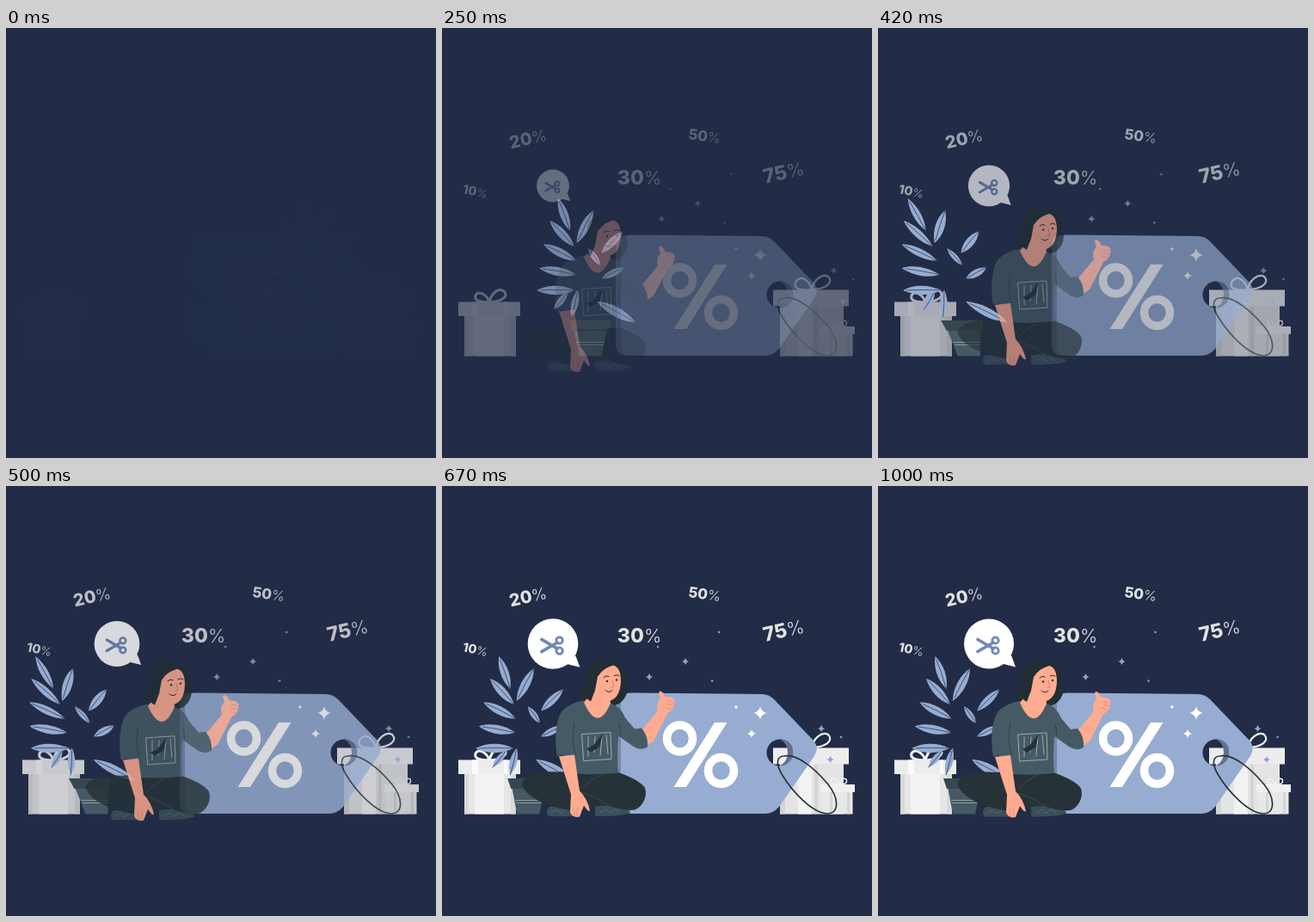
These frames come from a looping animation (500x500 px, 1.04 s). An HTML page:

```html
<!DOCTYPE html>
<html lang="en">
<head>
<meta charset="utf-8">
<title>Discounts</title>
<style>
html, body { margin: 0; height: 100%; overflow: hidden; background: #222c47; }
svg { display: block; width: 100vw; height: 100vh; }
text { font: 800 1em Inter, sans-serif; fill: #e2e2e2; text-anchor: middle; }
tspan { font-weight: 300; font-size: .94em; }
.line { fill: none; stroke-linecap: round; stroke-linejoin: round; }
.skin { fill: #ffab90; }
</style>
</head>
<body>
<svg viewBox="0 0 500 500">
  <defs>
    <path id="star" d="M0-4Q.8-.8 4 0Q.8 .8 0 4Q-.8 .8-4 0Q-.8-.8 0-4Z"/>
    <circle id="dot" r="1.200"/>
  </defs>

  <g class="fade">
    <!-- left gift -->
    <path class="line" d="M55 319C44 319 37 317 39 311C42 305 52 309 55 319C58 307 66 302 72 306C78 312 70 318 55 319" stroke="#f2f2f2" stroke-width="3"/>
    <path d="M26 334H86V381.500H26Z" fill="#e6e6e6"/>
    <path d="M26 334H31V381.500H26ZM80 334H86V381.500H80Z" fill="#d9d9d9"/>
    <path d="M38 334H72V381.500H38Z" fill="#f3f3f3"/>
    <path d="M19 318.500H91V335H19Z" fill="#ececec"/>
    <path d="M35 318.500H42V335H35ZM72 318.500H76V335H72Z" fill="#fafafa"/>
    <!-- right gifts -->
    <path class="line" d="M430 304C417 306 408 303 411 296C417 285 427 294 430 304C432 293 442 285 449 289C456 296 446 304 430 304" stroke="#f2f2f2" stroke-width="2.200"/>
    <path d="M393 323H467V381.500H393Z" fill="#e4e4e4"/>
    <path d="M393 323H399V381.500H393ZM433 323H437V381.500H433Z" fill="#d4d4d4"/>
    <path d="M414 323H430V381.500H414Z" fill="#f2f2f2"/>
    <path d="M385 304.500H473V323.500H385Z" fill="#ededed"/>
    <path class="line" d="M462 347C452 347 450 341 455 340Q460 341 462 347Q465 338 470 341C472 346 468 347 462 347" stroke="#f2f2f2" stroke-width="1.500"/>
    <path d="M442 355H477.500V381.500H442Z" fill="#e8e8e8"/>
    <path d="M451 355H454V381.500H451ZM471 355H474V381.500H471Z" fill="#d6d6d6"/>
    <path d="M440 347H480V356H440Z" fill="#f0f0f0"/>
  </g>

  <g id="plant">
    <path d="M81 350H120L113 381.500H87Z" fill="#455a64"/>
    <path d="M76 340H125L121 352H80Z" fill="#37474f"/>
    <path d="M85 365.500H116M86 368.500H115" stroke="#8c9ba3"/>
  </g>

  <g class="fade">
    <!-- tag -->
    <path d="M218 241H210Q202 243 202 254V368Q202 379 212 381H222Z" fill="#7587ab"/>
    <path fill-rule="evenodd" d="M220 240.500L372 242Q380 242 386 248L432 296Q439 304 433 314L392 373Q385 381 376 381H220Q208 381 208 370V252Q208 240.500 220 240.500ZM393 294.500A15.500 15.500 0 1 0 393 325.500A15.500 15.500 0 1 0 393 294.500Z" fill="#97acd1"/>
    <path d="M393 294.500A15.500 15.500 0 0 1 393 325.500Q402 320 402 310Q402 299 393 294.500Z" fill="#62718f"/>
    <path class="line" d="M398 314C389 314 388 323 395 335C407 355 430 380 448 381C463 381 461 362 449 347C434 329 413 311 398 314" stroke="#263238" stroke-width="1.600"/>
    <g fill="none" stroke="#fff" stroke-width="9.500">
      <ellipse cx="276.500" cy="293.500" rx="15" ry="15.500"/>
      <ellipse cx="324.500" cy="331" rx="15" ry="15.500"/>
    </g>
    <path d="M317 275H331.500L284 350H269.500Z" fill="#fff"/>
    <g fill="#fff">
      <use href="#star" transform="translate(370 264) scale(1.900)"/>
      <use href="#star" transform="translate(360 288) scale(1.250)"/>
      <use href="#star" transform="translate(342 257) scale(.600)"/>
    </g>
  </g>

  <g class="fade">
    <text transform="translate(37.500 195) rotate(12)" font-size="14.500" style="font-size:14.5px">10<tspan>%</tspan></text>
    <text transform="translate(101.500 135.500) rotate(-13)" style="font-size:20px">20<tspan>%</tspan></text>
    <text transform="translate(229.500 181.500)" style="font-size:23px">30<tspan>%</tspan></text>
    <text transform="translate(304.500 131.500) rotate(8)" style="font-size:17px">50<tspan>%</tspan></text>
    <text transform="translate(399 175.500) rotate(-13)" style="font-size:23px">75<tspan>%</tspan></text>
  </g>

  <g class="fade" id="sparks" fill="#8fa5cd">
    <use href="#star" x="241.500" y="222"/>
    <use href="#star" x="283.500" y="204"/>
    <use href="#star" x="441.500" y="282"/>
    <use href="#star" x="452" y="318"/>
    <use href="#dot" x="251.500" y="187"/>
    <use href="#dot" x="322.500" y="170"/>
    <use href="#dot" x="314.500" y="226.500"/>
    <use href="#dot" x="464.500" y="292"/>
  </g>

  <g class="fade" id="bubble">
    <path d="M155 197L160 210.500L142 206Z" fill="#fff"/>
    <circle cx="129" cy="183.500" r="29" fill="#fff"/>
    <g class="line" stroke="#7188b4">
      <path d="M116 178.500L134 189M116 192.500L134 182" stroke-width="3.600"/>
      <circle cx="136.500" cy="179.500" r="3.700" stroke-width="2.800"/>
      <circle cx="136.500" cy="191.500" r="3.700" stroke-width="2.800"/>
    </g>
  </g>

  <g class="fade" id="person">
    <!-- hair behind the head -->
    <path d="M192 203C178 200 169 208 169 221C166 232 158 239 160 247C163 254 170 251 173 255Q190 260 205 254C213 250 219 237 214 229C215 213 207 202 192 203Z" fill="#222e33"/>
    <!-- feet -->
    <path d="M124 374Q140 370 154 377V384.500H124Q120 380 124 374ZM178 373L205 371Q219 376 219 381Q206 385 178 384.500Z" fill="#3c4f58"/>
    <path d="M127 380L133 377L138 381L144 377M184 380L190 376L195 381L201 376L207 380" class="line" stroke="#566b75"/>
    <!-- trousers -->
    <path d="M134 333C113 331 92 337 93 348C98 363 124 374 152 378L190 371Q213 379 224 377C235 373 240 358 235 350C227 341 211 336 199 331Z" fill="#263238"/>
    <path class="line" d="M160 357Q176 359 193 372M186 336Q172 342 164 352" stroke="#44535a" stroke-width=".8"/>
    <!-- raised forearm and hand -->
    <path class="skin" d="M234 305L246 297Q256 278 262 265Q271 261 270.500 250Q268 245 260 246Q257 239 253 239Q251 241 254 247Q248 255 251 262L231 286Z"/>
    <path class="line" d="M262 250L269 252M262 254L269 256M260 258L266 260" stroke="#df8a72" stroke-width=".8"/>
    <!-- shirt and neck -->
    <path d="M165 250Q176 266 196 253Q208 257 213 270L224 283L232 282Q240 291 239 304Q230 309 222 303L205 291Q203 316 205 334Q166 338 141 333V313L134 315C130 291 133 266 143 259Q152 252 165 250Z" fill="#455a64"/>
    <path class="skin" d="M165 252L176 238H194L196 253Q181 288 165 252Z"/>
    <path class="line" d="M154 276Q150 294 155 313M206 276L208 290" stroke="#30434b"/>
    <path class="line" d="M163 289L196 287L197 318L165 320ZM170 292V315M178 292L177 310M186 291L184 314M191 290L193 312" stroke="#a8b4b9" stroke-width=".9"/>
    <path d="M168 306L176 302L187 288L183 304L173 310Z" fill="#263238"/>
    <!-- lowered arm -->
    <path class="skin" d="M136 315L154 313L160 355Q169 364 172 378Q170 380 165 372L160 385Q152 387 149 380L150 359Z"/>
    <path class="line" d="M153 374L154 384M158 374L157 384" stroke="#df8a72" stroke-width=".8"/>
    <!-- face -->
    <path class="skin" d="M179 221Q188 212 199 209Q208 211 208 228Q207 246 196 250Q184 250 180 240Q175 236 176 228Q177 223 179 221Z"/>
    <path d="M203 207Q188 211 181 222L178 238L173 251L167 247L172 218Q180 202 203 207Z" fill="#222e33"/>
    <path class="line" d="M188 223Q191 220 194 222M200 221Q203 219 206 221M190 238Q194 242 198 238" stroke="#263238"/>
    <path class="line" d="M198 226L200 234L197 234.500" stroke="#d9816b"/>
    <circle cx="192" cy="227.500" r="1.200" fill="#263238"/>
    <circle cx="203" cy="226" r="1.200" fill="#263238"/>
  </g>
</svg>
<script>
const $ = id => document.getElementById(id);

// a leaf around its centre, with a midrib
function leaf(x, y, angle, len) {
  const h = len / 2, w = 2 + len * .11;
  $('plant').insertAdjacentHTML('beforeend', `<g transform="translate(${x} ${y}) rotate(${angle})">
    <path d="M${-h} 0C${-h * .4} ${-w} ${h * .4} ${-w} ${h} 0C${h * .4} ${w} ${-h * .4} ${w} ${-h} 0" fill="#97acd1"/>
    <path d="M${-h * .8} 0Q0 -1 ${h} 0" class="line" stroke="#33456b" stroke-width=".8"/></g>`);
}

// left side, fanning from upright to flat
for (let i = 0; i < 5; i++) leaf(73 - 3 * i, 217 + 22 * i, 71 * (1 - i / 4) ** 1.4, 40 + i);
// right side, around an arc
for (let i = 0; i < 3; i++) {
  const a = (i * 60 - 90) * Math.PI / 180;
  leaf(97 + 36 * Math.cos(a), 267 + 36 * Math.sin(a), 18 * i - 62, 43 - 7 * i);
}
// low leaves above the pot, and the small one in the middle
for (let i = 0; i < 3; i++) leaf(67 + 16 * i * i, 317 + 3.3 * i * i, 129 - 25 * i * i, 26 + 6 * i * i);
leaf(107, 266, 55, 24);

const cubic = (a, b, s) => 3 * (1 - s) ** 2 * s * a + 3 * (1 - s) * s * s * b + s ** 3;

// cubic-bezier(.36, -.01, .5, 1.38)
function ease(x) {
  if (x <= 0) return 0;
  if (x >= 1) return 1;
  let lo = 0, hi = 1;
  for (let i = 0; i < 30; i++) {
    const mid = (lo + hi) / 2;
    if (cubic(.36, .5, mid) < x) lo = mid; else hi = mid;
  }
  return cubic(-.01, 1.38, lo);
}

const clamp = v => Math.max(0, Math.min(1, v));
const mix = (a, b, p) => a + (b - a) * p;
const tan = deg => Math.tan(deg * Math.PI / 180);
const faded = document.querySelectorAll('.fade');
const move = (id, transform) => $(id).setAttribute('transform', transform);

function pose(u) {
  const p = ease(u), left = 1 - p;
  faded.forEach(el => el.setAttribute('opacity', clamp(p)));
  move('person', `translate(0 ${21 * left})`);
  move('sparks', `translate(${20 * left} 0)`);
  move('bubble', `translate(129 183.500) scale(${mix(.5, 1, p)}) translate(-129 -183.500)`);

  // plant rushes in from the right, its lean swinging back and forth
  const rush = ease(u / .6);
  const lean = u < .6 ? mix(tan(-20), tan(10), rush)
    : u < .8 ? mix(tan(10), tan(-2), ease((u - .6) / .2))
    : mix(tan(-2), 0, ease((u - .8) / .2));
  move('plant', `matrix(1 0 ${lean} 1 ${250 * (1 - rush) - lean * 289} 0)`);
  $('plant').setAttribute('opacity', clamp(rush));
}

const start = performance.now();
function tick() {
  const t = (performance.now() - start) % 1040;
  // 24 steps a second, the first one held twice as long
  const step = Math.min(24, Math.floor((t + 4) * .024));
  pose(((step < 2 ? 0 : step) + 1) / 24);
  requestAnimationFrame(tick);
}
tick();
</script>
</body>
</html>
```
